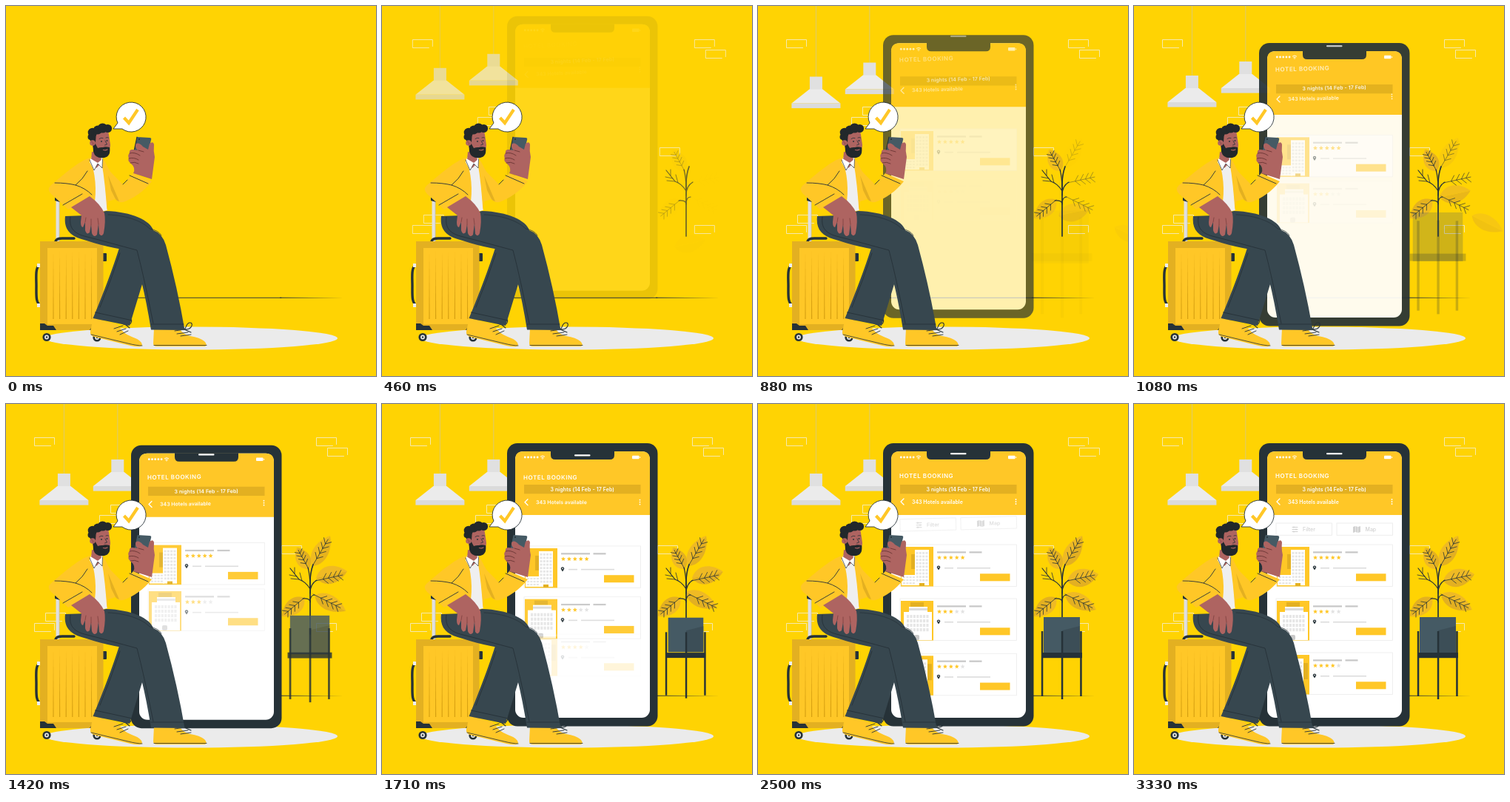
These frames come from a looping animation (500 px wide and 500 px high, 3430 ms). An HTML page:

```html
<!DOCTYPE html>
<html lang="en">
<head>
<meta charset="utf-8">
<title>Hotel booking</title>
<style>
html, body { margin: 0; width: 100%; height: 100%; overflow: hidden; background: #ffd303; }
svg { display: block; width: 100%; height: 100%; }
text { font-family: Inter, "Open Sans", sans-serif; font-size: 7px; font-weight: 600; }
</style>
</head>
<body>
<svg id="stage" viewBox="0 0 500 500"></svg>
<script>
const GOLD = '#ffc727', SHADE = '#e3b021', DARK = '#263238', SLATE = '#37474f';
const SKIN = '#ae6461', HAIR = '#22282b', PALE = '#ebebeb', GREY = '#dbdbdb';

const rect = (x, y, w, h, fill, r = 0) =>
  `<rect x="${x}" y="${y}" width="${w}" height="${h}" rx="${r}" fill="${fill}"/>`;
const path = (d, fill, extra = '') => `<path d="${d}" fill="${fill}" ${extra}/>`;
const line = (d, color = DARK, w = 0.9) =>
  `<path d="${d}" fill="none" stroke="${color}" stroke-width="${w}" stroke-linecap="round" stroke-linejoin="round"/>`;
const dot = (x, y, r, fill) => `<circle cx="${x}" cy="${y}" r="${r}" fill="${fill}"/>`;
const group = (id, body) => `<g id="${id}">${body}</g>`;
const range = (n, f) => Array.from({ length: n }, (_, i) => f(i)).join('');

function star(cx, cy, r, fill) {
  let pts = '';
  for (let i = 0; i < 10; i++) {
    const a = i * Math.PI / 5 - Math.PI / 2, q = i % 2 ? r * 0.45 : r;
    pts += `${(cx + q * Math.cos(a)).toFixed(2)},${(cy + q * Math.sin(a)).toFixed(2)} `;
  }
  return `<polygon points="${pts}" fill="${fill}"/>`;
}

/* Scenery */
const brick = ([x, y]) => line(`M${x + 27} ${y + 9}V${y}H${x}V${y + 11}H${x + 22}`, '#f5ecc0', 0.9);
const bricks = [[38.5, 45.5], [419.5, 45.5], [434.5, 59.5], [141.5, 136.5], [126.5, 150.5], [372.5, 191.5],
  [53.5, 282.5], [38.5, 296.5], [419.5, 296.5]].map(brick).join('');

const lamp = (x, y) => `<g transform="translate(${x} ${y})">` +
  line('M0 -200V0', '#d9c97c', 0.9) + rect(-8.5, 0, 17, 18, '#e0e0e0') +
  path('M-9 17H9L33 36H-33Z', PALE) + rect(-33, 36, 66, 6.6, GREY) + '</g>';

const floor = line('M176 394.3H372', DARK, 0.9) + path('M370 393.8L456 394.3L370 394.8Z', DARK) +
  `<ellipse cx="250" cy="449" rx="198" ry="15.5" fill="${PALE}"/>`;

/* Booking screen */
const phone =
  rect(169, 53, 203.5, 382.5, DARK, 14) + rect(180, 64, 182, 360, '#fff', 11) +
  path('M180 150V75Q180 64 191 64H351Q362 64 362 75V150Z', GOLD) +
  path('M228 63.5H314V69Q314 75 308 75H234Q228 75 228 69Z', DARK) +
  range(5, i => dot(193.3 + i * 4.2, 72, 1.4, '#fff')) +
  line('M214.3 71Q217 68.8 219.7 71M215.7 72.6Q217 71.6 218.3 72.6', '#fff', 1) + dot(217, 74, 0.7, '#fff') +
  rect(338, 69.8, 9.5, 4.4, '#fff', 1) + rect(348.2, 71.2, 1, 1.8, '#fff') +
  rect(192, 109, 157.5, 12.3, SHADE);

const nights = '<text x="270.8" y="117.5" text-anchor="middle" fill="#fff" style="letter-spacing:.1px">3 nights (14 Feb - 17 Feb)</text>';
const title = '<text x="191" y="100" fill="#fff" style="font-size:8px;letter-spacing:.55px">HOTEL BOOKING</text>';
const hotels = line('M197 128L193 132L197 136', '#fff', 1.3) +
  '<text x="208" y="134.5" fill="#fff">343 Hotels available</text>' +
  range(3, i => dot(348.5, 129 + i * 3, 0.9, '#fff'));

const windows = (x, y, cols, rows, dx, dy) => range(cols * rows, i =>
  rect(x + (i % cols) * dx, y + Math.floor(i / cols) * dy, dx - 1.3, dy - 1.8, '#e6e6e6'));
const pictures = [
  rect(207, 13, 6, 20, SHADE) + rect(212, 7, 19, 48, '#fff') + windows(213.5, 10, 4, 9, 4.3, 4.6) +
    rect(194, 41, 20, 14, '#fff') + windows(196, 43, 4, 3, 4.3, 4) + rect(218, 52, 7, 4, SHADE),
  rect(206, 5, 18, 6, SHADE) + rect(204, 11, 25, 9, '#fff') + rect(197, 18, 38, 38, '#fff') +
    windows(201, 22, 7, 4, 4.4, 6) + rect(204, 13, 25, 3, GREY) + rect(211, 49, 7, 7, '#c9c9c9', 2),
  rect(229, 14, 6, 22, SHADE) + rect(205, 8, 24, 47, '#fff') + windows(207, 12, 5, 8, 4.3, 5)
];
function card(i, y, stars) {
  return `<g transform="translate(0 ${y})">` +
    `<rect x="192" y="0" width="157.5" height="56.5" fill="#fff" stroke="#ececec" stroke-width=".8"/>` +
    rect(193, 3, 44, 53.5, GOLD) + pictures[i] +
    rect(242, 9.3, 39, 2.2, '#c7c7c7') + rect(285.5, 9.3, 17, 2.2, '#c7c7c7') +
    range(5, k => star(245 + k * 7.9, 17.6, 3.2, k < stars ? GOLD : '#e2e2e2')) +
    path('M244 34.6Q241.8 31.8 241.8 30.6A2.2 2.2 0 0 1 246.2 30.6Q246.2 31.8 244 34.6Z', DARK) + dot(244, 30.5, 0.8, '#fff') +
    rect(252, 30.9, 12, 1.6, '#dcdcdc') + rect(269, 30.9, 45, 1.6, '#dcdcdc') +
    rect(300, 39.3, 40.5, 10, GOLD) + '</g>';
}

const box = x => `<rect x="${x}" y="161" width="75.5" height="16.3" fill="#fff" stroke="#ececec" stroke-width=".9"/>`;
const filters = box(192) + box(274) +
  line('M214 166.5H221M214 169.5H221M214 172.5H221', '#d2d2d2', 1) +
  dot(216, 166.5, 1.1, '#d2d2d2') + dot(219, 169.5, 1.1, '#d2d2d2') + dot(216, 172.5, 1.1, '#d2d2d2') +
  path('M296 166L299 165V173L296 174ZM299.5 165L302.5 166V174L299.5 173ZM303 166L306 165V173L303 174Z', '#d2d2d2') +
  '<text x="228" y="172" fill="#d0d0d0" style="font-weight:500">Filter</text>' +
  '<text x="312.5" y="172" fill="#d0d0d0" style="font-weight:500">Map</text>';

/* Plant */
function leaf(name, x, y, tx, ty, w) {
  const len = Math.hypot(tx - x, ty - y), a = Math.atan2(ty - y, tx - x) * 180 / Math.PI;
  const place = `transform="translate(${x} ${y}) rotate(${a})"`;
  const half = s => `M0 0C${len * 0.2} ${s * w} ${len * 0.65} ${s * w} ${len} 0Z`;
  const veins = [0.25, 0.42, 0.58, 0.73].map(k =>
    `M${len * k} 0l${len * 0.13} ${w * 0.42}M${len * k} 0l${len * 0.13} ${-w * 0.42}`).join('');
  return {
    fill: group('leaf' + name, `<g ${place}>${path(half(1), SHADE)}${path(half(-1), '#efba24')}</g>`),
    vein: group('vein' + name, `<g ${place}>${line(`M0 0H${len * 0.88}${veins}`, DARK, 0.7)}</g>`)
  };
}
const leaves = [
  leaf('A', 409, 223, 393, 194, 13), leaf('B', 414, 219, 438, 178, 14),
  leaf('C', 418, 239, 460, 230, 16), leaf('D', 403, 262, 373, 287, 14),
  leaf('E', 415, 257, 457, 278, 14)
];
const stem = line('M411 311V240Q411 228 415 217', DARK, 1.7) +
  line('M411 248Q411 232 408 221M411 256Q411 243 420 238M411 268Q411 262 401 263M411 268Q411 258 417 258M411 250Q405 240 396 237L384 222', DARK, 1.2) +
  line('M396 237L385 236M393 233L383 231M390 229L390 221M400 239L397 228', DARK, 0.8);

const pot = group('potA', rect(386, 288, 49, 48, '#455a64') + path('M411 306L435 300V336H411Z', '#3c4e57')) +
  group('potB', rect(383, 336, 55, 7.2, DARK)) + group('legA', rect(382.8, 307, 2.5, 88, DARK)) +
  group('legB', rect(409.8, 307, 2.5, 92, DARK)) + group('legC', rect(435.2, 307, 2.5, 88, DARK));

/* Traveller */
const wheel = (x, y) => dot(x, y, 5.6, DARK) + dot(x, y, 2.9, PALE) + dot(x, y, 1.2, DARK);
const suitcase =
  rect(67.5, 262, 4.5, 56, '#e0e0e0') + line('M72 264V318', '#bdbdbd', 0.8) + path('M66 259H73V265L66 263Z', DARK) +
  line('M67 318Q68 314 76 314H92', DARK, 3.4) +
  line('M47 349C39 352 41 366 41 378C41 392 40 401 47 405', DARK, 3.4) +
  rect(42, 348, 5, 5, '#eee') + rect(42, 402, 5, 5, '#eee') + rect(130, 334, 6, 11, DARK, 1) +
  wheel(55, 447.5) + wheel(123, 448) +
  rect(46, 318, 85.5, 120, SHADE) + rect(56, 327, 67, 103, GOLD) +
  range(7, i => path(`M${64 + i * 8.6} 331l.6 92l-1.2 0Z`, '#d59f10')) +
  path('M46 429H52L56 432H64L68 438H46Z', DARK) + path('M131.5 429H126L122 432H117L113 438H131.5Z', DARK);

const shoe = (d, sole) => path(d, GOLD) + line(sole, DARK, 0.8);
const legs =
  shoe('M118 422L114 439Q113 445 119 447L168 459Q183 462 184 458Q184 452 170 447Q158 443 150 430Z', 'M115 444L165 456Q177 459 184 459') +
  line('M146 436L158 432M150 440L162 436M154 444L165 439') +
  line('M162 431C172 431 171 421 166 423C162 425 164 430 162 431C157 426 152 428 162 431L167 435', DARK, 1.1) +
  path('M153 327Q140 368 117.5 422L167 432L184 376L182 326Z', SLATE) +
  line('M120.5 414L168.5 424.5M154 334Q142 371 127 407') +
  shoe('M200 436L199 456Q199 460 204 460H269Q273 458 268 453Q262 448 249 446Q240 444 234 436Z', 'M200 458.5H271') +
  line('M228 439L242 437M231 443L246 441M236 446L250 444') +
  line('M241 437C252 438 254 427 248 428C243 429 244 435 241 437C235 432 230 436 241 437L250 441', DARK, 1.1) +
  path('M80 284C78 301 86 310 102 315C124 322 150 329 175 331.5L183 372Q190 400 196 437.5L241.5 438Q232 382 216 323Q211 307 199 303C195 290 170 278 135 277L110 283Z', SLATE) +
  line('M87 285C85 299 91 307 106 311C130 317 154 324 177 330Q187 368 199 429M196 430H240') +
  line('M138 282C165 283 186 292 194 301Q206 303 210 310', DARK, 0.7);

const torso =
  path('M115 204L130 204L134 240L137 276L116 281L119 240Z', '#efefef') +
  path('M131 207C136 212 137 219 143 226L158 241L172 226L197 237C186 251 172 260 160 264.5Q153 267 148 261L138 264L136.5 277C135 255 133 232 129 210Z', GOLD) +
  path('M138 229L153 264Q150 264 148 261L142 249Z', SHADE) +
  path('M113 205C100 209 78 227 60 243Q55 248 61 254L84 275L116 258L119 270C123 250 121 225 113 205Z', GOLD) +
  line('M110 223Q104 234 94 242Q107 246 116 255M66 239Q82 239 94 242M77 269L103 254M167 229L192 240M158 241L164 235') +
  path('M116 197L128 199L129 212L122 219L115 208Z', SKIN) +
  path('M114 206L113 211L119 222L124 213L130 219L131 206L124 212Z', '#fff') +
  line('M113 208L119 222L124 213L130 219L130.5 207', DARK, 0.7);

const hand =
  path('M88 272L113 257Q128 268 133 280Q135 290 132 307Q130 313 126 308L125 294L123 309Q119 314 116 307L115 295L113 306Q109 310 107 303L107 292L104 299Q101 299 101 292L102 283Z', SKIN) +
  line('M107 292L108 286M115 296L115 288M125 295L124 287', '#7d3f3f', 0.8);

const curls = [[114.5, 177, 4], [117, 171, 6.3], [124, 167.5, 6], [130.5, 165, 6.6], [137.5, 165.5, 5.6]];
const head =
  path('M118 174L138 168Q140 180 141 188Q141 200 130 203Q121 201 117 190Z', SKIN) +
  path('M117 178Q121 187 124 192Q128 190.5 131 191Q134 189.5 140 191Q142 203 133 205Q121 207 118 197Z', HAIR) +
  curls.map(([x, y, r]) => dot(x, y, r, HAIR)).join('') + path('M112 176L122 170L121 184L115 186Z', HAIR) +
  dot(117, 185, 3.8, SKIN) + line('M115.5 183.5Q118.5 184 117.5 187', '#7d3f3f', 0.7) +
  dot(129, 183, 0.9, DARK) + dot(136.5, 182, 0.9, DARK) +
  line('M126 179.5Q128 177.5 131 178.5M135 178Q137 177 138.5 178M134 182L136.5 187L133.5 188', DARK, 0.8) +
  line('M131.5 194.5Q134.5 195.5 137 194', SKIN, 1.2);

const raised =
  path('M177 177L194 178Q197 178 196 181L192 198L173 196Z', '#455a64') + line('M177 177L173 196', DARK, 1.2) +
  dot(180, 180, 1, DARK) +
  path('M172 226Q176 219 168 212Q164 209 166 206Q164 201 167 199Q166 194 171 194L178 195Q173 190 176 186Q180 184 185 190L192 194L194 186Q199 182 200 187Q199 196 201 204L197 234Z', SKIN) +
  line('M167 199Q174 197 181 202M166 206Q173 204 179 208M168 212Q174 210 179 213M179 195L186 197', '#63302f', 0.8);

const bubble = path('M151 158L145 166L157 166A20 20 0 1 0 149.5 154Z', '#fff', `stroke="${DARK}" stroke-width=".9"`) +
  `<path d="M159.5 151L166 158L178 140" fill="none" stroke="${GOLD}" stroke-width="4.2"/>`;

document.getElementById('stage').innerHTML =
  rect(0, 0, 500, 500, '#ffd303') + group('bricks', bricks) + group('lamps', lamp(78.4, 94) + lamp(150.8, 75)) +
  floor + group('phone', phone) + group('speaker', rect(260, 66, 21.5, 2.3, '#fff', 1)) +
  group('nights', nights) + group('title', title) + group('hotels', hotels) +
  group('cardA', card(0, 190, 5)) + group('cardB', card(1, 263, 3)) + group('cardC', card(2, 336, 4)) +
  group('filters', filters) +
  leaves.map(l => l.fill).join('') + leaves.map(l => l.vein).join('') + group('stem', stem) + pot +
  suitcase + legs + torso + hand + head + raised + bubble;

/* Motion */
const LOOP = 3430, LAST = 3330;
const cubic = (a, b, s) => 3 * (1 - s) * (1 - s) * s * a + 3 * (1 - s) * s * s * b + s * s * s;
function ease(x) {
  if (x <= 0 || x >= 1) return x <= 0 ? 0 : 1;
  let lo = 0, hi = 1;
  for (let i = 0; i < 22; i++) {
    const mid = (lo + hi) / 2;
    if (cubic(0.36, 0.5, mid) < x) lo = mid; else hi = mid;
  }
  return cubic(-0.01, 1.38, lo);
}

const slide = (dx, dy) => q => `translate(${dx * q} ${dy * q})`;
const still = slide(0, 0);
const tilt = (dy, cx, cy) => (q, x) => `translate(0 ${dy * q}) rotate(${-3 * (1 - x)} ${cx} ${cy})`;
const zoom = (cx, cy) => q => {
  const k = 1 + q / 2;
  return `translate(${cx * (1 - k)} ${cy * (1 - k)}) scale(${k})`;
};

// id, start, duration, transform of the remaining distance
const tracks = [
  ['bricks', 40, 700, slide(32, 0)],
  ['lamps', 40, 920, slide(0, -30)],
  ['phone', 250, 1350, slide(0, -43)],
  ['nights', 250, 1400, tilt(-45, 271, 115)],
  ['hotels', 290, 1450, tilt(-45, 271, 132)],
  ['title', 370, 1450, tilt(-45, 228, 97)],
  ['speaker', 380, 1450, slide(0, -45)],
  ['cardA', 540, 1450, slide(0, -30)],
  ['cardB', 810, 1480, slide(0, -30)],
  ['cardC', 1390, 1500, slide(0, -30)],
  ['filters', 1690, 1600, tilt(-30, 271, 169)],
  ['stem', 40, 900, still],
  ['leafA', 250, 1200, still],
  ['leafB', 780, 1100, still],
  ['leafC', 300, 1500, slide(-24, 90)],
  ['leafD', 350, 1200, still],
  ['leafE', 640, 1200, slide(78, 49)],
  ['veinA', 150, 1000, still],
  ['veinB', 560, 1200, still],
  ['veinC', 400, 1200, still],
  ['veinD', 150, 1000, still],
  ['veinE', 400, 1200, still],
  ['potA', 770, 1200, zoom(410.5, 312)],
  ['potB', 770, 1200, zoom(410.5, 339.6)],
  ['legA', 770, 1200, zoom(384, 351)],
  ['legB', 770, 1200, zoom(411, 353)],
  ['legC', 770, 1200, zoom(436.5, 351)]
].map(([id, start, span, move]) => ({ el: document.getElementById(id), start, span, move }));

function draw(t) {
  for (const { el, start, span, move } of tracks) {
    const x = Math.min(1, Math.max(0, (t - start) / span)), p = ease(x);
    el.setAttribute('transform', move(1 - p, x));
    el.setAttribute('opacity', Math.min(1, Math.max(0, p)));
  }
}

const begin = performance.now();
function tick() {
  draw(Math.min((performance.now() - begin) % LOOP, LAST));
  requestAnimationFrame(tick);
}
tick();
</script>
</body>
</html>
```
